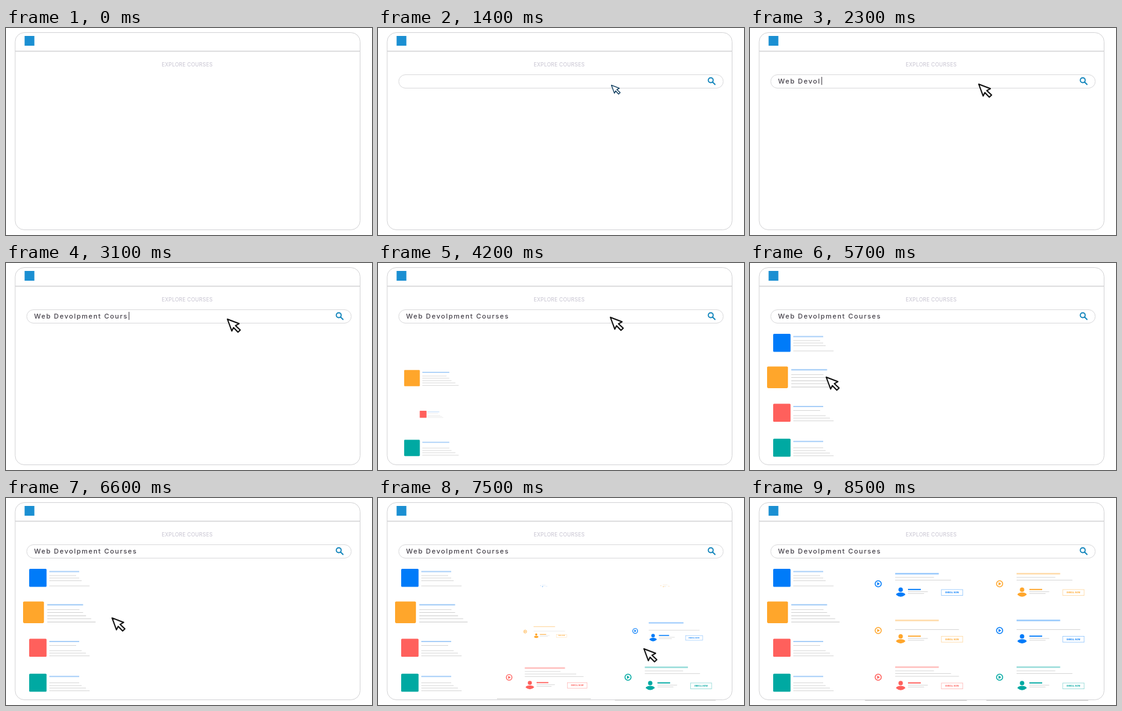
These frames come from a looping animation (600x339 px, 9000 ms). An HTML page:

```html
<!DOCTYPE html>
<html lang="en">
<head>
<meta charset="utf-8">
<title>Explore courses</title>
<style>
  html, body { margin: 0; width: 100%; height: 100%; overflow: hidden; background: #fff; }
  svg { display: block; width: 100vw; height: 100vh; }
  text { font-family: Inter, "Open Sans", sans-serif; }
</style>
</head>
<body>
<svg id="stage" viewBox="0 0 600 339"></svg>
<script>
const LOOP = 9000;
const BLUE = '#007bf9', AMBER = '#ffa62b', RED = '#ff605c', TEAL = '#00a9a2';
const QUERY = 'Web Devolpment Courses';
const $ = id => document.getElementById(id);

const line = (x1, x2, y, color = '#d2d2d2', w = 0.9) =>
  `<path d="M${x1} ${y}H${x2}" stroke="${color}" stroke-width="${w}"/>`;

// Result list: colour, row centre, visible lines, start of the pop
const items = [
  [BLUE, 131, [0, 1, 2, 4], 4210],
  [AMBER, 188.3, [0, 1, 2, 3, 4], 3985],
  [RED, 245.5, [0, 2, 3, 4], 4140],
  [TEAL, 302.7, [1, 2, 3, 4], 3985]
];
const itemLines = [[27, -8], [32, -4], [36, 0.5], [43, 4.5], [49, 9]];

// Course cards: colour, centre, visible lines, start of the pop
const cards = [
  [BLUE, 271.5, 144, [0, 1], 7490],
  [AMBER, 470.5, 144, [0, 1], 7486],
  [AMBER, 271.5, 220.5, [2], 7420],
  [BLUE, 470.5, 220.5, [2], 7336],
  [RED, 271.5, 297, [0, 1, 2], 7272],
  [TEAL, 470.5, 297, [0, 1], 7190]
];
const cardLines = [[30, -14], [58, -9.5], [71, -5]];

const drawItem = ([color, , rows], i) => `<g id="item${i}">
  <rect x="-50" y="-19" width="28.5" height="29.5" rx="1.5" fill="${color}"/>
  ${line(-17, 32, -14.5, '#a9cff8', 2)}
  ${rows.map(r => line(-17, ...itemLines[r])).join('')}</g>`;

const drawCard = ([color, , y, rows], i) => `<g id="card${i}">
  <circle cx="-61.3" cy="-3.5" r="5" fill="none" stroke="${color}" stroke-width="1.5"/>
  <path d="M-63-6.2v5.4l4.4-2.7z" fill="${color}"/>
  <g opacity=".4">${line(-33.5, 38, -20, color, 2.6)}</g>
  ${rows.map(r => line(-33.5, ...cardLines[r])).join('')}
  <circle cx="-24.5" cy="6.2" r="3.6" fill="${color}"/>
  <path d="M-32 14.5C-32 9.5-17 9.5-17 14.5Q-24.5 21-32 14.5z" fill="${color}"/>
  ${line(-12.5, 8.5, 5.8, color, 1.9)}
  ${line(-12.5, 20, 9.5)}${line(-12.5, 14, 12.5)}
  <rect x="42.3" y="6" width="35" height="9.6" fill="none" stroke="${color}" stroke-width=".8" opacity=".45"/>
  <text x="59.8" y="12" text-anchor="middle" font-size="3.3" font-weight="700" fill="${color}">ENROLL NOW</text>
  ${y > 290 ? line(-83, 84, 34.5, '#c9c9c9', 1) : ''}</g>`;

$('stage').innerHTML = `
  <g fill="none" stroke="#d3d3d5">
    <rect x="15" y="7.5" width="565.5" height="323" rx="15"/>
    <path d="M15 38H580.5" stroke-width="1.6"/>
  </g>
  <rect x="30.5" y="13" width="16" height="16" fill="#1b8fd2"/>
  <text x="297" y="63" text-anchor="middle" font-size="8.4" font-weight="500" letter-spacing=".25" fill="#cdcad6">EXPLORE COURSES</text>
  <g id="bar" fill="none">
    <rect x="-266" y="-11" width="532" height="22" rx="11" stroke="#d9d9db"/>
    <path d="M249.5-2a4 4 0 1 1-8 0a4 4 0 1 1 8 0M248.5 1L253 5.5" stroke="#1687bd" stroke-width="1.9"/>
  </g>
  <text id="query" x="46" y="90.5" font-size="11" font-weight="500" letter-spacing="1.48" fill="#45414a"></text>
  ${items.map(drawItem).join('')}
  ${cards.map(drawCard).join('')}
  <path id="pointer" d="M1 1L20 8.3L14.2 11.6L22 18.8L18.3 22.3L11 14.8L8.2 20.4Z"
    fill="#fff" stroke-width="2" stroke-linejoin="round"/>`;

const clamp = v => Math.min(1, Math.max(0, v));
const phase = (t, start, length) => clamp((t - start) / length);
const easeOut = p => 1 - (1 - p) ** 3;
const easeInOut = p => p * p * (3 - 2 * p);
const place = (id, x, y, s) => $(id).setAttribute('transform', `translate(${x} ${y}) scale(${s})`);

// Pointer path: time, x, y, scale
const path = [
  [500, 602, 163, 1], [1200, 382, 92, 1], [1400, 382, 93, 0.68], [1650, 382, 92, 1],
  [2300, 374, 91, 1], [3000, 362, 91, 1], [3300, 362, 91, 1], [3850, 380, 88, 1],
  [4400, 380, 88, 1], [5250, 124, 186, 1], [6300, 124, 186, 1], [7500, 435, 246, 1], [9000, 435, 246, 1]
];

function pointerAt(t) {
  if (t <= path[0][0]) return path[0].slice(1);
  const k = path.findIndex(p => p[0] >= t);
  const a = path[k - 1], b = path[k];
  const p = easeInOut((t - a[0]) / (b[0] - a[0]));
  return [1, 2, 3].map(j => a[j] + (b[j] - a[j]) * p);
}

function draw(t) {
  place('bar', 300, 87.5, easeOut(phase(t, 300, 500)));

  const typed = Math.max(0, Math.floor((t - 1600) / 75));
  $('query').textContent = QUERY.slice(0, typed) + (t >= 1600 && t < 3300 ? '|' : '');

  items.forEach(([, y, , start], i) => {
    const hover = i === 1 ? 0.2 * easeInOut(phase(t, 5300, 300)) : 0;
    place('item' + i, 88, y + 4, easeOut(phase(t, start, 400)) + hover);
  });
  cards.forEach(([, x, y, , start], i) => place('card' + i, x, y, easeOut(phase(t, start, 400))));

  const [x, y, s] = pointerAt(t);
  place('pointer', x, y, s);
  $('pointer').setAttribute('stroke', s < 0.95 ? '#0b3a5c' : '#111');
  $('pointer').setAttribute('opacity', 1 - phase(t, 7700, 400));
}

const began = performance.now();
function tick() {
  draw((performance.now() - began) % LOOP);
  requestAnimationFrame(tick);
}
tick();
</script>
</body>
</html>
```
